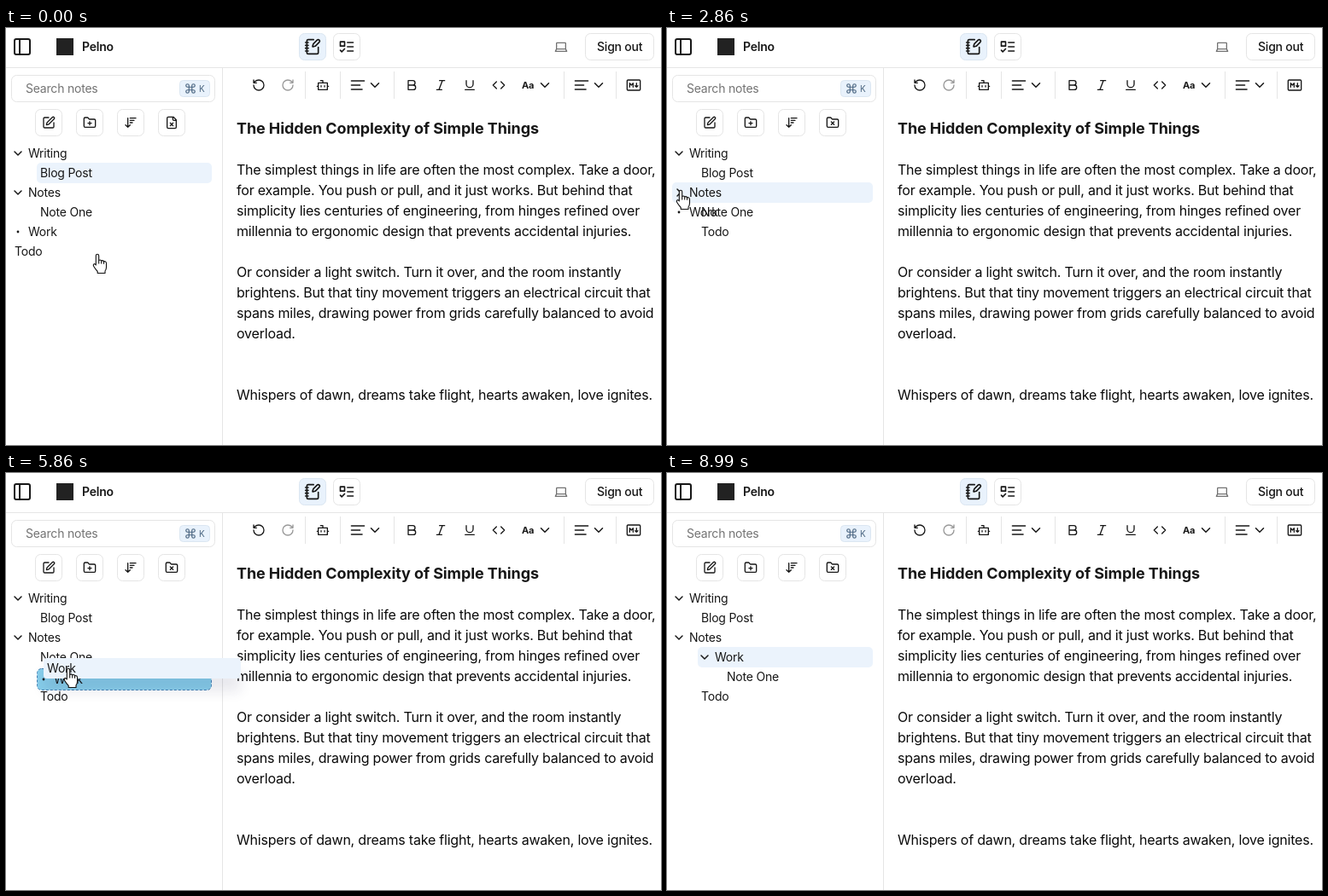
These frames come from a looping animation (767x489 px, 9640 ms). An HTML page:

```html
<!DOCTYPE html>
<html lang="en">
<head>
<meta charset="utf-8">
<title>Notes drag and drop</title>
<style>
  html, body { margin: 0; width: 100%; height: 100%; overflow: hidden; background: #fff; }
  svg { position: absolute; left: 0; top: 0; }
  svg, #overlay { font: 14px Inter, sans-serif; letter-spacing: -.015em; color: #171717; }
  text { fill: #171717; white-space: pre; }
  .body text { font-size: 16px; fill: #0a0a0a; }
  .icon { fill: none; stroke: currentColor; stroke-width: 2; stroke-linecap: round; stroke-linejoin: round; }
  .button { fill: #fff; stroke: #e5e5e5; }
  .active { fill: #e9f2fc; stroke: #dbe6f1; }
  .rule { stroke: #e5e5e5; fill: none; }
  .highlight { fill: #ebf3fc; }
  .slot { fill: #87ceeb; stroke: #4682b4; stroke-dasharray: 3 2; }
  #overlay { position: absolute; left: 0; top: 0; width: 231px; height: 24px; line-height: 24px; padding-left: 4px;
    box-sizing: border-box; border-radius: 4px; box-shadow: 0 15px 15px 0 rgba(34, 33, 81, .1); }
  .pointer { fill: #fff; stroke: #111; stroke-width: 1.1; stroke-linejoin: round; }
</style>
</head>
<body>
<svg id="stage" width="767" height="489">
  <path class="rule" d="M0 46.5H767M253.5 47V489M350.5 51v32M391.5 51v32M454.5 51v32M653.5 51v32M714.5 51v32"/>
  <rect x="59" y="12" width="20" height="20" fill="#222"/>
  <text x="89" y="27" font-weight="600">Pelno</text>
  <rect class="button" x="678.5" y="6.5" width="80" height="31" rx="6"/>
  <text x="692" y="27" font-weight="500">Sign out</text>
  <rect class="button" x="6.5" y="55.5" width="238" height="31" rx="6"/>
  <text x="23" y="76" style="fill:#737373">Search notes</text>
  <rect class="active" x="203.5" y="61.5" width="35" height="19" rx="4"/>
  <text x="226" y="75" font-size="10" style="fill:#4a6580">K</text>
  <text x="604" y="71" font-size="11" font-weight="700">Aa</text>
  <text x="270" y="124" style="font-size:18px;font-weight:700;letter-spacing:-.1px">The Hidden Complexity of Simple Things</text>
  <g class="body" id="body"></g>
</svg>
<div id="overlay"></div>
<svg width="767" height="489">
  <g id="cursor">
    <g class="pointer">
      <path d="M-1.7 12.5V2a1.7 1.7 0 0 1 3.4 0v5.5q1.6-1.2 3 .4 1.8-.8 2.8.7 3-.2 3 2.4v4.5q0 2.5-1.5 4.5v2.5H.2v-2q-2.8-3-4.6-6.2-.8-2.2.6-2.6 1.1-.2 2.1 1.3z"/>
      <path d="M1.7 7.5v4M4.7 8v3.5M7.5 8.7v3"/>
    </g>
    <path class="pointer" d="M0 0v16l3.7-3.5 2.6 6 2.4-1-2.6-5.9H11z"/>
    <path d="M-3-7.5h2L0-7l1-.5h2M0-7V7M-3 7.5h2L0 7l1 .5h2" fill="none" stroke="#111"/>
  </g>
</svg>
<script>
const LOOP = 9640;
const stage = document.getElementById('stage');
const overlay = document.getElementById('overlay');
const cursor = document.getElementById('cursor');

function add(tag, attrs, parent = stage) {
  const node = document.createElementNS('http://www.w3.org/2000/svg', tag);
  for (const key in attrs) node.setAttribute(key, attrs[key]);
  return parent.appendChild(node);
}

// Icons are drawn on a 24 unit grid and centred on (x, y).
function icon(d, x, y, size = 16, color = '#171717', parent = stage) {
  return add('path', { d, class: 'icon', color,
    transform: `translate(${x} ${y}) scale(${size / 24}) translate(-12 -12)` }, parent);
}

function button(x, y, d, size, active) {
  add('rect', { class: active ? 'active' : 'button', x: x - 15.5, y: y - 15.5, width: 31, height: 31, rx: 6 });
  return icon(d, x, y, size);
}

const CHEVRON = 'm6 9 6 6 6-6';
const ALIGN = 'M21 6H3M15 12H3M18 18H3';
const FOLDER = 'M20 20a2 2 0 0 0 2-2V8a2 2 0 0 0-2-2h-7.9a2 2 0 0 1-1.69-.9L9.6 3.9A2 2 0 0 0 7.93 3H4a2 2 0 0 0-2 2v13a2 2 0 0 0 2 2Z';
const FOLDER_X = FOLDER + 'M9.5 10.5l5 5m0-5-5 5';
const FILE_X = 'M15 2H6a2 2 0 0 0-2 2v16a2 2 0 0 0 2 2h12a2 2 0 0 0 2-2V7ZM14 2v4a2 2 0 0 0 2 2h4m-5.5 4.5-5 5m0-5 5 5';

// Header
icon('M5 3h14a2 2 0 0 1 2 2v14a2 2 0 0 1-2 2H5a2 2 0 0 1-2-2V5a2 2 0 0 1 2-2zM9 3v18', 19, 22, 24);
button(359, 22, 'M13.4 2H6a2 2 0 0 0-2 2v16a2 2 0 0 0 2 2h12a2 2 0 0 0 2-2v-7.4M2 6h4M2 10h4M2 14h4M2 18h4M21.378 5.626a1 1 0 1 0-3.004-3.004l-5.01 5.012a2 2 0 0 0-.506.854l-.837 2.87a.5.5 0 0 0 .62.62l2.87-.837a2 2 0 0 0 .854-.506z', 20, true);
button(399, 22, 'M3 5h6v6H3zM3 17l2 2 4-4M13 6h8M13 12h8M13 18h8', 20);
icon('M5 5h14a1 1 0 0 1 1 1v10H4V6a1 1 0 0 1 1-1zM2 20h20l-2-4H4z', 650, 22, 16, '#737373');

// Sidebar tools
icon('M15 6v12a3 3 0 1 0 3-3H6a3 3 0 1 0 3 3V6a3 3 0 1 0-3 3h12a3 3 0 1 0-3-3', 216, 71, 14, '#4a6580');
button(50, 111, 'M12 3H5a2 2 0 0 0-2 2v14a2 2 0 0 0 2 2h14a2 2 0 0 0 2-2v-7M18.375 2.625a1 1 0 0 1 3 3l-9.013 9.014a2 2 0 0 1-.853.505l-2.873.84a.5.5 0 0 1-.62-.62l.84-2.873a2 2 0 0 1 .506-.852z');
button(98, 111, FOLDER + 'M12 10v6M9 13h6');
button(146, 111, 'm3 16 4 4 4-4M7 20V4M11 4h10M11 8h7M11 12h4');
const removeIcon = button(194, 111, FILE_X);

// Editor toolbar
[
  ['M3 12a9 9 0 1 0 9-9 9.75 9.75 0 0 0-6.74 2.74L3 8M3 3v5h5', 296],
  ['M21 12a9 9 0 1 1-9-9c2.52 0 4.93 1 6.74 2.74L21 8M21 3v5h-5', 330, 16, '#999'],
  ['M12 8V4H8M4 8h16v12H4zM2 14h2M20 14h2M15 13v2M9 13v2', 371],
  [ALIGN, 412, 20], [CHEVRON, 432, 18],
  ['M6 12h9a4 4 0 0 1 0 8H6V4h8a4 4 0 0 1 0 8', 475],
  ['M19 4h-9M14 20H5M15 4 9 20', 509],
  ['M6 4v6a6 6 0 0 0 12 0V4M4 20h16', 543],
  ['m16 18 6-6-6-6M8 6l-6 6 6 6', 577],
  [CHEVRON, 631, 18], [ALIGN, 674, 20], [CHEVRON, 694, 18],
  ['M2 3h20a1.5 1.5 0 0 1 1.500 1.500v15a1.500 1.500 0 0 1-1.500 1.500H2a1.500 1.500 0 0 1-1.500-1.500v-15A1.500 1.500 0 0 1 2 3zM5 15.500v-7l3 3.500 3-3.500v7M17 8.500v7m-2.500-2.500 2.500 2.500 2.500-2.500', 735]
].forEach(([d, x, size, color]) => icon(d, x, 67, size, color));

[
  'The simplest things in life are often the most complex. Take a door,',
  'for example. You push or pull, and it just works. But behind that',
  'simplicity lies centuries of engineering, from hinges refined over',
  'millennia to ergonomic design that prevents accidental injuries.',
  '',
  'Or consider a light switch. Turn it over, and the room instantly',
  'brightens. But that tiny movement triggers an electrical circuit that',
  'spans miles, drawing power from grids carefully balanced to avoid',
  'overload.',
  '', '',
  'Whispers of dawn, dreams take flight, hearts awaken, love ignites.'
].forEach((line, i) => {
  add('text', { x: 270, y: 172 + 24 * i }, document.getElementById('body')).textContent = line;
});

const ramp = (t, from, to) => Math.min(1, Math.max(0, (t - from) / (to - from)));
const smooth = p => p * p * (3 - 2 * p);
const mix = (a, b, p) => a + (b - a) * p;

// Position from [time, x, y] keys; two keys at one time make a jump.
function track(keys, t, ease = p => p) {
  const next = keys.findIndex(key => key[0] > t);
  if (next < 1) return keys.at(next).slice(1);
  const a = keys[next - 1], b = keys[next];
  const p = ease(ramp(t, a[0], b[0]));
  return [mix(a[1], b[1], p), mix(a[2], b[2], p)];
}

const CLOSE = 2860, OPEN = 3400, NESTED = 7900, DROP = 250;
const isClosed = t => t >= CLOSE && t < OPEN;
const childAlpha = t => 1 - ramp(t, CLOSE + 40, CLOSE + 200) + ramp(t, OPEN, OPEN + 180);

// drag: [start, end, overlay text x and y relative to the pointer]
const rows = [
  { name: 'Writing', folder: true, keys: [[0, 26, 147]] },
  { name: 'Blog Post', keys: [[0, 40, 170]], selected: t => 1 - ramp(t, 2210, 2430) },
  { name: 'Notes', folder: true, keys: [[0, 26, 193]], closed: isClosed,
    selected: t => ramp(t, 2210, 2430) - ramp(t, 4700, 4940) },
  { name: 'Note One', alpha: childAlpha, drag: [7560, NESTED, -22, 3],
    keys: [[0, 40, 216], [5890, 40, 216], [6090, 40, 239], [7700, 40, 239], [7700, 70, 239]] },
  { name: 'Work', folder: true, empty: t => t < NESTED, drag: [5600, 6620, -25, 0], fill: '#ebf3fc',
    selected: t => t < 6620 ? ramp(t, 4700, 4940) : ramp(t, 6620, 6860),
    keys: [[0, 26, 239], [870, 26, 239], [1110, 26, 262], [CLOSE, 26, 262], [CLOSE, 26, 216],
      [OPEN, 26, 216], [OPEN, 26, 262], [5650, 26, 262], [5650, 56, 262], [5840, 56, 239],
      [5890, 56, 239], [6090, 56, 216]] },
  { name: 'Todo', alpha: childAlpha, drag: [740, 1640, -22, 5],
    keys: [[0, 10, 262], [800, 10, 262], [800, 40, 262], [870, 40, 262], [1110, 40, 239],
      [5650, 40, 239], [5840, 40, 262]] }
];

for (const row of rows) {
  row.group = add('g', {});
  row.box = add('rect', { rx: 5 }, row.group);
  row.dot = add('circle', { r: 1.4, fill: '#171717' }, row.group);
  row.arrow = add('path', { d: 'M-4-2 0 2 4-2', class: 'icon', style: 'stroke-width:1.5' }, row.group);
  row.label = add('text', { y: 5 }, row.group);
  row.label.textContent = row.name;
}

const pointerKeys = [
  [90, 107, 265], [330, 92, 396], [640, 32, 257], [720, 32, 257], [980, 60, 241], [1040, 61, 240],
  [1160, 75, 175], [1340, 75, 175], [1640, 60, 245], [2190, 60, 245], [2430, 16, 190], [3450, 16, 190],
  [3770, 62, 104], [3830, 62, 104], [4250, 46, 260], [4460, 46, 260], [4520, 46, 253], [5310, 46, 253],
  [5430, 51, 262], [5590, 51, 262], [5860, 73, 229], [6100, 76, 214], [6350, 76, 214], [6470, 72, 212],
  [6860, 72, 212], [7280, 62, 236], [7490, 62, 236], [7750, 92, 236], [7950, 92, 236],
  [8450, 521, 367], [8990, 735, 505]
];

function drawRow(row, t) {
  const [x, y] = track(row.keys, t, smooth);
  const dragged = row.drag && t >= row.drag[0] && t < row.drag[1];
  const left = x - (row.folder ? 20 : 4);
  row.group.setAttribute('transform', `translate(0 ${y + (dragged ? 3 : 0)})`);
  row.group.style.opacity = row.alpha ? row.alpha(t) : 1;

  const inset = dragged ? .5 : 0;
  row.box.setAttribute('class', dragged ? 'slot' : 'highlight');
  row.box.setAttribute('x', left + inset);
  row.box.setAttribute('y', dragged ? -12.5 : -12);
  row.box.setAttribute('width', 241 - left - 2 * inset);
  row.box.setAttribute('height', dragged ? 25 : 24);
  row.box.style.opacity = dragged ? 1 : row.selected ? row.selected(t) : 0;

  const empty = row.empty && row.empty(t);
  row.label.setAttribute('x', x);
  row.dot.setAttribute('cx', x - 12);
  row.dot.style.display = empty ? '' : 'none';
  row.arrow.style.display = row.folder && !empty ? '' : 'none';
  row.arrow.setAttribute('transform',
    `translate(${x - 12} 0) rotate(${row.closed && row.closed(t) ? -90 : 0})`);
}

function drawOverlay(t) {
  const row = rows.find(({ drag }) => drag && t >= drag[0] && t < drag[1] + DROP);
  overlay.style.display = row ? '' : 'none';
  if (!row) return;
  const [, end, dx, dy] = row.drag;
  const [px, py] = track(pointerKeys, Math.min(t, end));
  const [x, y] = track(row.keys, t, smooth);
  const p = smooth(ramp(t, end, end + DROP));
  const textX = mix(px + dx, row.folder ? x - 16 : x, p);
  overlay.textContent = row.name;
  overlay.style.background = row.fill || 'none';
  overlay.style.opacity = 1 - p;
  overlay.style.transform = `translate(${textX - 4}px, ${mix(py + dy, y, p) - 12}px)`;
}

function drawCursor(t) {
  const [x, y] = track(pointerKeys, t);
  const shape = x > 254 ? 2 : y > 137 && y < 275 ? 0 : 1;
  [...cursor.children].forEach((node, i) => { node.style.display = i === shape ? '' : 'none'; });
  cursor.setAttribute('transform', `translate(${x} ${y})`);
}

function draw() {
  const t = performance.now() % LOOP;
  removeIcon.setAttribute('d', t < 2250 ? FILE_X : FOLDER_X);
  rows.forEach(row => drawRow(row, t));
  drawOverlay(t);
  drawCursor(t);
  requestAnimationFrame(draw);
}
draw();
</script>
</body>
</html>
```
